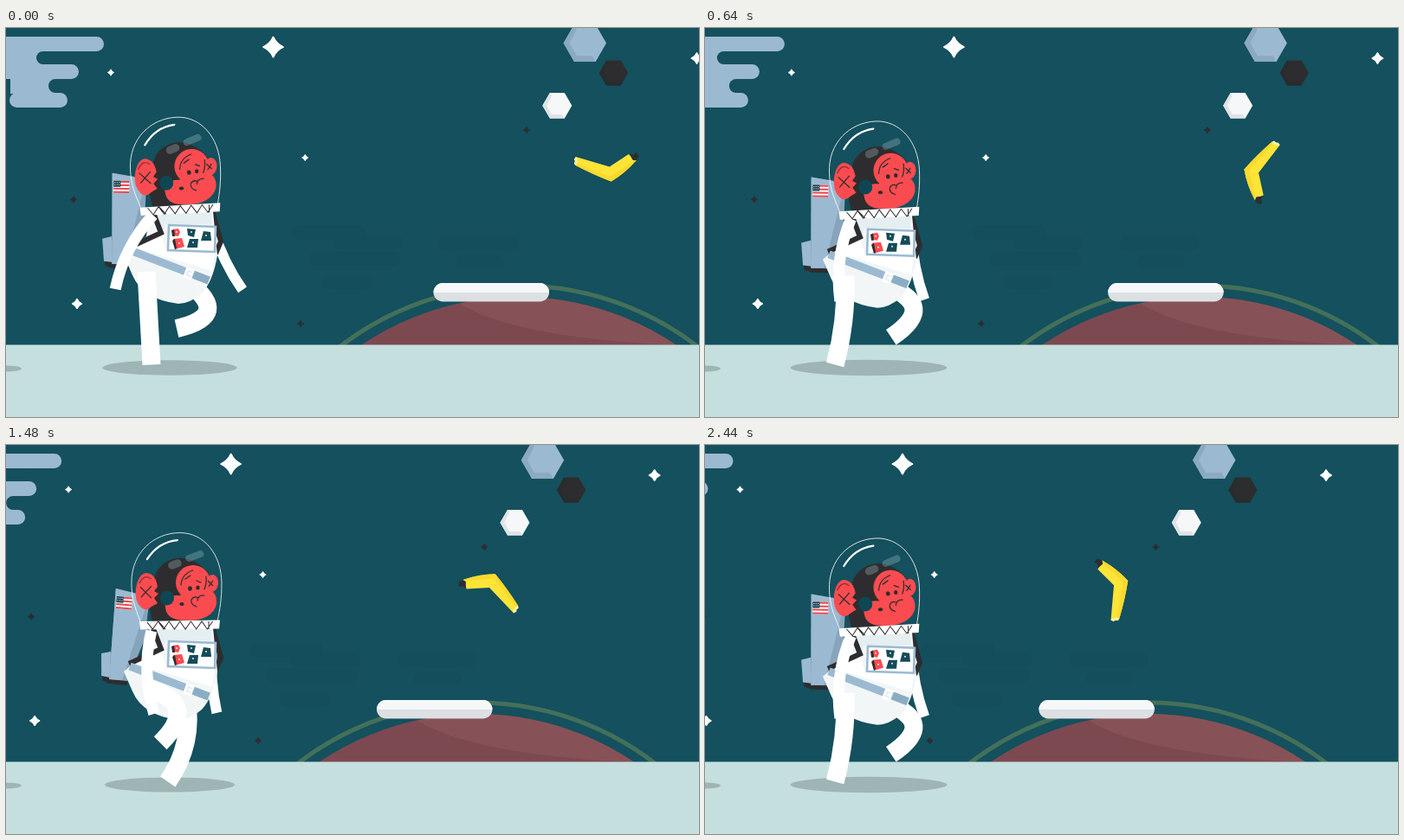
Write an HTML page with a canvas that moves like this. It is 800 px wide and 450 px high and loops after 2.48 s.

```html
<!DOCTYPE html>
<html>
<head>
<meta charset="utf-8">
<style>
html, body { margin: 0; width: 100%; height: 100%; overflow: hidden; background: #14505d; }
canvas { display: block; }
</style>
</head>
<body>
<canvas width="800" height="450"></canvas>
<script>
const ctx = document.querySelector('canvas').getContext('2d');
const LOOP = 2480, STEP = 40, STRIDE = 600, TAU = Math.PI * 2;
const SKY = '#14505d', BLUE = '#9bbad2', STEEL = '#88a4bb', DARK = '#2d2d2f', RED = '#fa4c50';
const wave = (t, peak) => Math.cos(TAU * (t - peak) / STRIDE);

const fill = (color, d) => { ctx.fillStyle = color; ctx.fill(new Path2D(d)); };
const stroke = (color, width, d, cap = 'butt') => {
  ctx.strokeStyle = color;
  ctx.lineWidth = width;
  ctx.lineCap = cap;
  ctx.stroke(new Path2D(d));
};
const ellipse = (color, x, y, rx, ry = rx, angle = 0) => {
  ctx.fillStyle = color;
  ctx.beginPath();
  ctx.ellipse(x, y, rx, ry, angle, 0, TAU);
  ctx.fill();
};
const pill = (color, x, y, w, h) => {
  ctx.fillStyle = color;
  ctx.beginPath();
  ctx.roundRect(x, y, w, h, h / 2);
  ctx.fill();
};
const rect = (color, x, y, w, h) => { ctx.fillStyle = color; ctx.fillRect(x, y, w, h); };
const at = (x, y, degrees, draw) => {
  ctx.save();
  ctx.translate(x, y);
  ctx.rotate(degrees * Math.PI / 180);
  draw();
  ctx.restore();
};
const turn = (x, y, degrees, draw) => at(x, y, degrees, () => { ctx.translate(-x, -y); draw(); });

function star(x, y, r, color = '#fff') {
  const k = r * .31;
  const d = `M0 ${-r}Q${k} ${-k} ${r} 0Q${k} ${k} 0 ${r}Q${-k} ${k} ${-r} 0Q${-k} ${-k} 0 ${-r}Z`;
  at(x, y, 0, () => {
    ctx.lineJoin = 'round';
    fill(color, d);
    stroke(color, r * .16, d);
  });
}

function hexagon(x, y, r, color, shade) {
  at(x, y, 0, () => {
    ctx.scale(r, r);
    fill(color, 'M-1 0L-.5-.87L.5-.87L1 0L.5.87L-.5.87Z');
    fill(shade, 'M-1 0L-.5-.87L-.38-.66L-.72 0L-.38.6L.34.6L.5.87L-.5.87Z');
  });
}

function scenery() {
  [[330, 228, 85], [378, 240, 80], [350, 258, 105], [365, 285, 58], [500, 240, 92], [520, 262, 55]]
    .forEach(([x, y, w]) => pill('rgba(16,60,85,.07)', x, y, w, 17));

  [[308.5, 22, 11.5], [121, 51.5, 3.8], [345.3, 150, 3.8], [82, 319, 6], [797.5, 35, 6.5]]
    .forEach(s => star(...s));
  [[78, 198.5, 3.8], [601, 118, 3.8], [340, 342, 3.8]].forEach(s => star(...s, DARK));

  pill(BLUE, -40, 10, 153, 17);
  pill(BLUE, -40, 42, 124, 17);
  pill(BLUE, 4, 75, 67, 17);
  rect(BLUE, -30, 26, 74, 17);
  rect(BLUE, 5, 58, 52, 18);
  pill(SKY, 35, 27, 40, 15);
  pill(SKY, 49, 59, 30, 16);

  hexagon(668.3, 17.5, 24.7, BLUE, '#8ba9c0');
  hexagon(701.5, 52, 16.6, DARK, '#292b2d');
  hexagon(636.3, 89.8, 17, '#f5f7f8', '#dfe3e5');

  ctx.strokeStyle = '#44705a';
  ctx.lineWidth = 5;
  ctx.beginPath();
  ctx.arc(592, 635, 337, 0, TAU);
  ctx.stroke();
  ellipse('#7d4951', 592, 635, 324);
  fill('#875257', 'M524 318.5A324 324 0 0 1 774 367Q585 358 524 318.5Z');
}

// Time, centre x, centre y, rotation
const flight = [
  [0, 694.7, 157, 0], [280, 675.7, 160, 47], [640, 643, 167, 111], [880, 618, 170, 146],
  [1480, 558, 169, 210], [2080, 501, 166, 247], [2440, 469, 165, 258.5], [2480, 465.5, 165, 259.5]
];

// Cubic through the flight keys with finite-difference tangents
function flightAt(t) {
  const last = flight.length - 1;
  let i = 0;
  while (i < last - 1 && t >= flight[i + 1][0]) i++;
  const slope = (n, c) => {
    const a = flight[Math.max(n - 1, 0)], b = flight[Math.min(n + 1, last)];
    return (b[c] - a[c]) / (b[0] - a[0]);
  };
  const a = flight[i], b = flight[i + 1], span = b[0] - a[0], u = (t - a[0]) / span;
  return [1, 2, 3].map(c =>
    a[c] + (b[c] - a[c]) * u * u * (3 - 2 * u) +
    span * u * (1 - u) * (slope(i, c) * (1 - u) - slope(i + 1, c) * u));
}

function banana(t) {
  at(...flightAt(t), () => {
    fill('#ffe438', 'M-37-8L2 3.5L24-11L33-4Q20 11 4 20.5Q-16 13-37 2Z');
    fill('#fad92f', 'M-37-1L3 15L32-5L33-4Q20 11 4 20.5Q-16 13-37 2Z');
    fill(DARK, 'M25-11L29-10L33-13L36-9L33-4L29-4Z');
    fill('#fff3b0', 'M-37-8L-35-6L-36-4L-35-1L-37 2L-39 0L-38-3L-39-5Z');
  });
}

function leg(hipX, hipY, phase, shift) {
  const a = phase * TAU;
  const x = 178 - 46 * Math.sin(a) - 10 * Math.cos(a) + shift;
  const s = (((phase % 1) + 1) % 1 - .15) / .55;
  const y = 389.5 - (s > 0 && s < 1 ? 46 * Math.sin(Math.PI * s) : 0);
  const dx = x - hipX, dy = y - hipY, d = Math.hypot(dx, dy);
  const bend = 1.4 * Math.sqrt(Math.max(0, 52 * 52 - d * d / 4)) / d;
  stroke('#fff', 21, `M${hipX} ${hipY}Q${hipX + dx / 2 + dy * bend} ${hipY + dy / 2 - dx * bend} ${x} ${y}`);
}

function backpack() {
  fill(DARK, 'M111 266L120 268L141 271L139 278L119 276L111 272Z');
  fill(BLUE, 'M110 241L121 239L120 269L110 267Z');
  fill(STEEL, 'M127 166L166 177L160 225L140 273L119 271Z');
  fill(BLUE, 'M127 166L152 172L162 186L134 272L119 271Z');
  turn(128, 176, 5, () => {
    rect('#fff', 128, 175, 18, 14);
    for (let y = 175; y < 189; y += 4) rect('#e8474e', 128, y, 18, 2);
    rect('#164755', 128, 175, 8, 7);
    for (let i = 0; i < 6; i++) rect('#fff', 129 + i % 3 * 2.4, 176.5 + (i > 2) * 2.6, 1, 1);
  });
}

function torso() {
  stroke(DARK, 6, 'M238 210L248 246L242 260');
  fill('#f2f6f7', 'M166 211L239 211L244 262Q239 292 226 306Q212 318 199 318Q158 313 146 285L136 262L162 240Z');
  fill('#e5eef0', 'M170 212L237 212L238 226L184 226L178 240Z');
  fill('#fff', 'M179 240L186 258L241 259L238 280L150 253Z');
  stroke(DARK, 6, 'M169 210L179 236L142 253');

  fill('#fff', 'M188 227L242 229L241 258L187 256Z');
  stroke(BLUE, 2.6, 'M188 227L242 229L241 258L187 256Z');
  fill(RED, 'M193 232L199 231L201 235L199 240L193 239ZM193 243L203 242L206 252L195 255Z');
  fill(DARK, 'M191 233L194 232L195 240L192 240ZM192 245L195 243L197 254L195 255Z');
  fill('#154b58', 'M209 231L219 232L217 241L210 239ZM212 243L222 243L221 253L209 253ZM228 234L236 235L237 245L225 245Z');
  [[197, 235], [200, 248], [214, 235], [216, 247], [231, 239]].forEach(p => ellipse('#fff', ...p, .9));

  stroke(BLUE, 9, 'M143 256L234 291');
  stroke('#8badc4', 9, 'M217 284.5L234 291');
  turn(211, 283, 21, () => {
    rect('#fff', 206, 276.5, 10, 13);
    rect('#d4e0e8', 209, 280, 5, 6);
    rect('#fff', 210, 281, 5, 4);
  });
}

function head() {
  fill(DARK, 'M169 205L166 190L172 170Q166 142 192 132Q214 126 234 148L238 180L200 205Z');

  ellipse(RED, 238, 160, 7, 10, .1);
  ellipse(RED, 216, 159, 20, 20);
  fill(RED, 'M184 188C182 177 190 173 200 174L228 168C240 166 244 174 243 184C240 198 224 204 208 203C192 203 185 198 184 188Z');
  stroke(DARK, 1.2, 'M202 162Q203 149 216 145M231 152Q232 160 229 167', 'round');
  stroke(DARK, 1.3, 'M207 155L213 151M220 157L225 159', 'round');
  stroke(DARK, 1.2, 'M233 157L239 163M239 157L234 164');
  ellipse(DARK, 212.5, 166, 2.4, 2.7);
  ellipse(DARK, 221.5, 165, 2.2, 2.6);
  ellipse(DARK, 203, 184, 2.7, 2);
  stroke(DARK, 1.2, 'M220 187Q213 185 214 179Q217 174 222 177M221 180Q222 173 229 174', 'round');

  fill(RED, 'M162 148Q173 149 175 164L171 169L176 172L171 177L175 183L168 187Q162 193 156 188Q148 180 150 166Q153 149 162 148Z');
  stroke('#8d2d33', 1.2, 'M154 160Q160 148 168 155');
  stroke(DARK, 1.3, 'M155 164L168 177M168 163L156 176');
  ellipse('#0f4653', 186, 177, 8, 8.5);

  const glass = 'rgba(190,215,220,.27)';
  turn(195, 138, -20, () => pill(glass, 187, 133.5, 16, 9));
  turn(218, 128.5, -20, () => pill(glass, 207, 124.5, 22, 8));
  stroke('rgba(255,255,255,.9)', .9, 'M155 204C148 185 145 177 145 159C145 124 171 101.5 201 101.5C229 101.5 249 127 249 160C249 178 247 190 244 204');
  stroke('#fff', 2.2, 'M163 132Q176 112 198 110', 'round');

  fill('#fff', 'M154 204L247 202.5L246 212.5L155 213.5Z');
  let folds = 'M163 205';
  for (let i = 1; i < 13; i++) folds += `L${163 + i * 6.3} ${i % 2 ? 213 : 204}`;
  stroke(DARK, 1, folds + 'M176 204L184 213M234 204L234 213');
}

function astronaut(t) {
  const beat = (((t + 17) % 300) / 300) ** .8;
  const drop = (1 - Math.cos(TAU * beat)) / 2;
  const bob = drop * 10.5;
  const lean = (1 + wave(t, 20)) / 2;
  const swing = 18.5 - 36 * wave(t, 170);
  const phase = t / STRIDE;

  ellipse('#9fb4b4', 189, 393, 75 + 28 * drop, 8.6 + drop);
  leg(208, 292 + bob, phase + .5, 9);
  ctx.save();
  ctx.translate(0, bob);
  turn(135, 226, -4.2 * lean, backpack);
  at(238, 230, -swing, () => stroke('#fff', 12, 'M0 0Q-6 42 0 80'));
  torso();
  ctx.restore();
  leg(162, 281 + bob, phase, 0);
  ctx.save();
  ctx.translate(0, bob);
  at(168, 219, swing * 1.3 - 8, () => stroke('#fff', 13, 'M0 -4Q-14 44 -2 92'));
  turn(215, 195, -2.5 * lean, head);
  ctx.restore();
}

function frame(now) {
  const t = Math.floor(now % LOOP / STEP) * STEP;
  rect(SKY, 0, 0, 800, 450);
  at(-t * .033, 0, 0, scenery);
  at(-t * .0443, 0, 0, () => {
    pill('#dce0e3', 493.5, 295, 133.5, 21.5);
    ctx.save();
    ctx.beginPath();
    ctx.rect(490, 290, 140, 16);
    ctx.clip();
    pill('#f5f7f8', 493.5, 295, 133.5, 21.5);
    ctx.restore();
  });
  banana(t);
  rect('#c5dfdf', 0, 366.5, 800, 84);
  ellipse('#9fb4b4', 0, 394, 18, 3.5);
  astronaut(t);
  requestAnimationFrame(frame);
}
requestAnimationFrame(frame);
</script>
</body>
</html>
```
